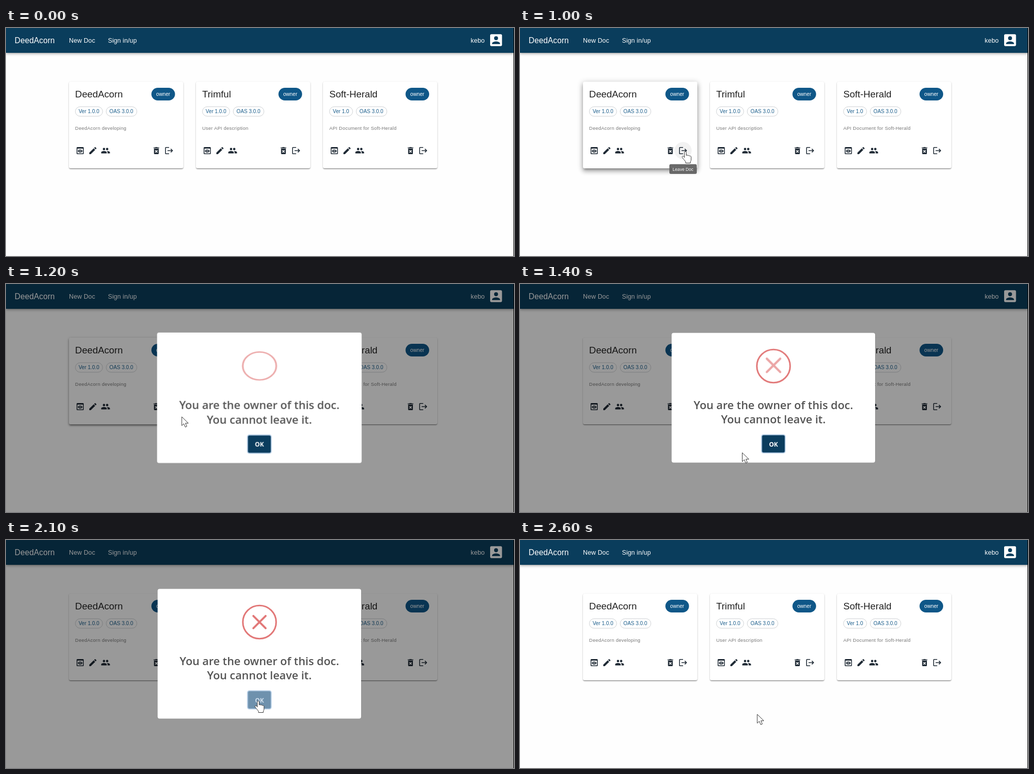
An HTML page for the animation above (2.7 s loop, 1000 by 450 pixels).

```html
<!DOCTYPE html>
<html lang="en">
<head>
<meta charset="utf-8">
<title>Document dashboard</title>
<style>
html, body { margin: 0; width: 100%; height: 100%; overflow: hidden; background: #fefefe; }
#stage { position: relative; width: 1000px; height: 450px; overflow: hidden; background: #fefefe;
  font-family: "Liberation Sans", Arial, sans-serif; }
#stage > *, #popup > * { position: absolute; left: 0; top: 0; }
svg { display: block; overflow: visible; }
header { width: 1000px; height: 49px; background: #0a3d5c;
  box-shadow: 0 1.5px 3px -1px #0003, 0 3px 4px #00000024, 0 1px 8px #0000001f; }
.card { width: 225px; height: 171px; border-radius: 3px; background: #fff; }
.title { font-size: 18.75px; fill: #212121; }
.chip { font-size: 10.16px; fill: #1b5e8c; }
.owner { font-size: 10.16px; fill: #fff; }
.note { font-size: 9.375px; letter-spacing: .0333em; fill: #777; }
.nav { font-size: 12.5px; letter-spacing: .0094em; fill: #fff; }
.brand { font-size: 15.625px; letter-spacing: .0075em; fill: #fff; }
.tip { font-size: 8.6px; fill: #fff; }
.icon { fill: #1f2a35; }
#dim { width: 1000px; height: 450px; background: #000; opacity: 0; }
#popup { width: 1000px; height: 450px; transform-origin: 498.75px 224.5px;
  font-family: "Open Sans", "Noto Sans", sans-serif; }
#popup > #icon { left: 463.75px; top: 127px; transform-origin: 35px 35px; }
#cross { transform-origin: 35px 35px; }
.message { font-size: 21.9px; font-weight: 600; fill: #555; text-anchor: middle; }
.ok { font-size: 12px; font-weight: 700; fill: #fff; text-anchor: middle; }
#edge { width: 1px; height: 450px; }
#stage > #edge { left: 999px; background: #000; }
</style>
</head>
<body>
<div id="stage">
  <header></header>
  <svg id="page" width="1000" height="450"></svg>
  <div id="dim"></div>
  <div id="popup">
    <svg width="1000" height="450">
      <rect x="298.5" y="96.5" width="400.5" height="256" rx="3.9" fill="#fff"/>
      <text class="message" x="498.75" y="247">You are the owner of this doc.</text>
      <text class="message" x="498.75" y="275">You cannot leave it.</text>
      <rect x="474.6" y="296.7" width="48.3" height="37.6" rx="4.5" fill="#6496c880"/>
      <g id="button">
        <rect x="476.5" y="298.5" width="44.6" height="34" rx="3" fill="#0b3d5e"/>
        <text class="ok" x="498.9" y="320.5">OK</text>
      </g>
    </svg>
    <svg id="icon" width="70" height="70" fill="none" stroke="#e27878">
      <circle cx="35" cy="35" r="32.8" stroke-width="3.1"/>
      <path id="cross" d="M22.9 22.9 47.1 47.1M47.1 22.9 22.9 47.1" stroke-width="3.9" stroke-linecap="round"/>
    </svg>
  </div>
  <svg id="tooltip" width="1000" height="450" opacity="0">
    <rect x="294" y="268.7" width="54" height="19.3" rx="3" fill="#616161" fill-opacity=".94"/>
    <text class="tip" x="300.3" y="281.6">Leave Doc</text>
  </svg>
  <svg width="1000" height="450">
    <g id="cursor" fill="#fff" stroke="#333" stroke-linejoin="round">
      <path id="arrow" d="M0 0V17.5L4 13.8 7 20.5 10 19 7.2 12.8H13Z"/>
      <path id="hand" d="M-1.8 2a1.8 1.8 0 0 1 3.6 0v6c.5-1 3-1 3.4.6.6-.9 2.8-.6 3.2.8.8-.7 3-.3 3 1.6v5.5c0 2-1.5 3.5-1.5 5V23H.5v-2c0-1.5-4-5-6.5-9-1-2 1-3.5 2.6-2l1.6 2z"/>
    </g>
  </svg>
  <div id="edge"></div>
</div>
<script>
const LOOP = 2700, STEP = 100;
const $ = id => document.getElementById(id);

const icons = {
  preview: 'M19 3H5a2 2 0 0 0-2 2v14a2 2 0 0 0 2 2h14a2 2 0 0 0 2-2V5a2 2 0 0 0-2-2zm0 16H5V7h14zM13.5 13a1.5 1.5 0 1 1-3 0 1.5 1.5 0 0 1 3 0zM12 9c-2.7 0-5 1.7-6 4 1 2.3 3.300 4 6 4s5-1.700 6-4c-1-2.300-3.300-4-6-4zm0 6.500a2.500 2.500 0 1 1 0-5 2.500 2.500 0 0 1 0 5z',
  edit: 'M3 17.25V21h3.75L17.81 9.94l-3.75-3.75zM20.71 7.04a1 1 0 0 0 0-1.41l-2.34-2.34a1 1 0 0 0-1.41 0l-1.83 1.83 3.75 3.75z',
  people: 'M16 11a3 3 0 1 0 0-6 3 3 0 0 0 0 6zM8 11a3 3 0 1 0 0-6 3 3 0 0 0 0 6zm0 2c-2.33 0-7 1.17-7 3.5V19h14v-2.5C15 14.17 10.33 13 8 13zm8 0-1 .05c1.2.85 2 1.970 2 3.450V19h6v-2.500c0-2.330-4.670-3.500-7-3.500z',
  remove: 'M6 19a2 2 0 0 0 2 2h8a2 2 0 0 0 2-2V7H6zm2.460-7.120 1.410-1.410L12 12.590l2.120-2.120 1.410 1.410L13.410 14l2.120 2.120-1.410 1.410L12 15.410l-2.120 2.120-1.410-1.410L10.590 14zM15.500 4l-1-1h-5l-1 1H5v2h14V4z',
  leave: 'M17 7l-1.410 1.410L18.170 11H8v2h10.170l-2.580 2.580L17 17l5-5zM4 5h8V3H4a2 2 0 0 0-2 2v14a2 2 0 0 0 2 2h8v-2H4z',
  account: 'M3 5v14a2 2 0 0 0 2 2h14a2 2 0 0 0 2-2V5a2 2 0 0 0-2-2H5a2 2 0 0 0-2 2zm12 4a3 3 0 1 1-6 0 3 3 0 0 1 6 0zm-9 8c0-2 4-3.100 6-3.100s6 1.100 6 3.100v1H6z'
};
const docs = [
  ['DeedAcorn', 'Ver 1.0.0', 54.5, 'DeedAcorn developing'],
  ['Trimful', 'Ver 1.0.0', 54.5, 'User API description'],
  ['Soft-Herald', 'Ver 1.0', 46.4, 'API Document for Soft-Herald']
];
const shadow = {
  rest: '0 2px 2px -1px rgba(0,0,0,.3), 0 1px 1px rgba(0,0,0,.2), 0 1px 3px rgba(0,0,0,.2)',
  hover: '0 4px 4px -2px rgba(0,0,0,.3), 0 6px 8px 1px rgba(0,0,0,.2), 0 2px 11px 2px rgba(0,0,0,.16)'
};

const text = (cls, x, y, s) => `<text class="${cls}" x="${x}" y="${y}">${s}</text>`;
const icon = (name, cx, cy, scale = .78125, cls = 'icon') =>
  `<path class="${cls}" fill="#fff" fill-rule="evenodd" d="${icons[name]}" transform="translate(${cx} ${cy}) scale(${scale}) translate(-12 -12)"/>`;
const chip = (x, w, s) =>
  `<rect x="${x + .4}" y="155.400" width="${w - .8}" height="18.750" rx="9.375" fill="none" stroke="#c8cbce" stroke-width=".9"/>` +
  text('chip', x + 6.8, 168.2, s);

function drawCard([title, version, width, note], i) {
  const x = 123.7 + 250.15 * i;
  const box = document.createElement('div');
  box.className = 'card';
  box.style.cssText = `left:${x}px;top:105.500px;box-shadow:${shadow.rest}`;
  $('stage').insertBefore(box, $('page'));
  const row = [['preview', 22.3], ['edit', 47.3], ['people', 72.3], ['remove', 172.3], ['leave', 197.3]];
  $('page').innerHTML +=
    text('title', x + 12.4, 136.8, title) +
    `<rect x="${x + 162.5}" y="118" width="46.500" height="25" rx="12.500" fill="#0f5788"/>` +
    text('owner', x + 171.8, 133.5, 'owner') +
    chip(x + 12.4, width, version) +
    chip(x + 18.6 + width, 61.2, 'OAS 3.0.0') +
    text('note', x + 12.4, 201.3, note) +
    row.map(([name, dx]) => icon(name, x + dx, 242)).join('');
  return box;
}

$('page').innerHTML =
  '<circle id="halo" cx="321" cy="242" r="17" fill="#000" fill-opacity=".05"/>' +
  text('brand', 17, 29.5, 'DeedAcorn') + text('nav', 124, 28.5, 'New Doc') +
  text('nav', 200.7, 28.5, 'Sign in/up') + text('nav', 914.8, 28.5, 'kebo') +
  icon('account', 964.7, 24, 1.3, 'avatar');
const firstCard = docs.map(drawCard)[0];

// Paused animations, driven by the shared clock.
const tracks = [];
function track(el, delay, duration, frames, fill = 'both') {
  const eased = frames.map(f => ({ easing: 'ease', ...f }));
  const a = el.animate(eased, { delay, duration, fill });
  a.pause();
  tracks.push(a);
}

track(firstCard, 430, 300, [{ boxShadow: shadow.rest }, { boxShadow: shadow.hover }]);
track(firstCard, 1080, 300, [{ boxShadow: shadow.hover }, { boxShadow: shadow.rest }], 'forwards');
track($('tooltip'), 850, 150, [{ opacity: 0 }, { opacity: 1 }]);
track($('tooltip'), 1020, 120, [{ opacity: 1 }, { opacity: 0 }], 'forwards');
track($('dim'), 1030, 100, [{ opacity: 0 }, { opacity: .4 }]);
track($('dim'), 2150, 100, [{ opacity: .4 }, { opacity: 0 }], 'forwards');
track($('popup'), 1037, 300, [
  { transform: 'scale(.7)' },
  { transform: 'scale(1.05)', offset: .45 },
  { transform: 'scale(.95)', offset: .8 },
  { transform: 'scale(1)' }
]);
track($('popup'), 2150, 150, [
  { transform: 'scale(1)', opacity: 1 },
  { transform: 'scale(.5)', opacity: 0 }
], 'forwards');
track($('icon'), 1005, 500, [
  { transform: 'rotateX(100deg)', opacity: 0 },
  { transform: 'rotateX(0deg)', opacity: 1 }
]);
track($('cross'), 1050, 500, [
  { transform: 'translateY(10px) scale(.4)', opacity: 0 },
  { transform: 'translateY(10px) scale(.4)', opacity: 0, offset: .5 },
  { transform: 'translateY(-2.4px) scale(1.15)', offset: .8 },
  { transform: 'translateY(0px) scale(1)', opacity: 1 }
]);

// time, x, y of the pointer's hot spot
const path = [
  [200, 352, 312], [400, 328, 273], [500, 321.5, 258], [600, 324, 247], [700, 325.5, 243.5],
  [1100, 325.5, 243.5], [1200, 346, 262], [1300, 398, 306], [1400, 437.5, 333],
  [1500, 458, 336], [1600, 481, 330], [1700, 494, 321], [1800, 496.5, 317.5],
  [2200, 496.5, 317.5], [2300, 494, 322], [2400, 485, 332], [2500, 474, 340], [2600, 467, 344]
];
const within = (t, a, b) => t >= a && t < b;
const show = (el, on) => { el.style.visibility = on ? 'visible' : 'hidden'; };

function pointAt(t) {
  const i = Math.max(1, path.findIndex(p => p[0] >= t));
  const [a, b] = [path[i - 1], path[i]];
  const k = Math.max(0, (t - a[0]) / (b[0] - a[0]));
  return [a[1] + (b[1] - a[1]) * k, a[2] + (b[2] - a[2]) * k];
}

function render(t) {
  for (const a of tracks) a.currentTime = t;
  const [x, y] = pointAt(t);
  const pointing = within(t, 600, 1200) || within(t, 1700, 2300);
  $('cursor').setAttribute('transform', `translate(${x} ${y})`);
  show($('arrow'), t >= 200 && !pointing);
  show($('hand'), pointing);
  show($('halo'), within(t, 600, 1200));
  show($('popup'), within(t, 1100, 2300));
  $('button').setAttribute('opacity', within(t, 1700, 2300) ? .4 : 1);
}

const start = performance.now();
function tick() {
  const t = (performance.now() - start) % LOOP;
  render(Math.floor(t / STEP) * STEP);
  requestAnimationFrame(tick);
}
tick();
</script>
</body>
</html>
```
